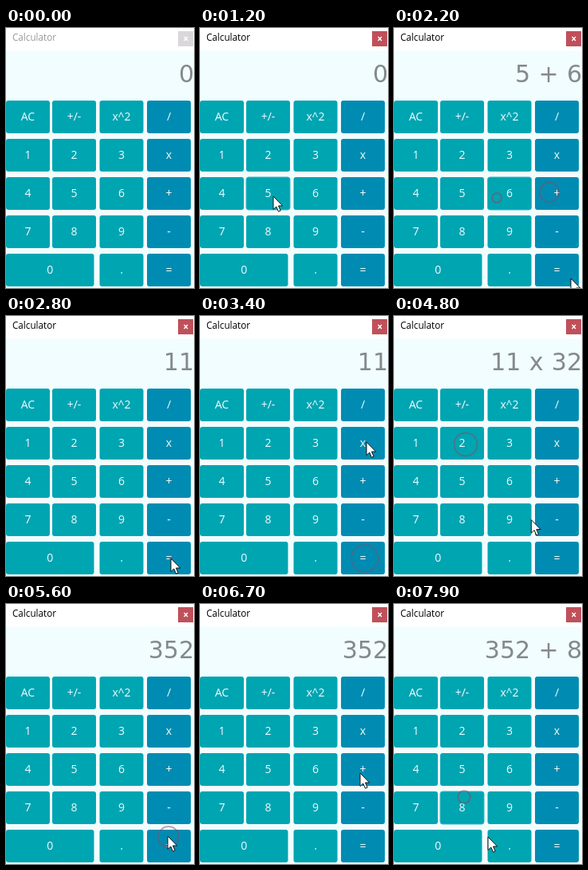
Recreate the animation shown at these times as an HTML page. Size 236 by 326 pixels, loop 8000 ms.

```html
<!DOCTYPE html>
<html lang="en">
<head>
<meta charset="utf-8">
<title>Calculator</title>
<style>
  html, body { margin: 0; width: 100%; height: 100%; overflow: hidden; background: #fff; }
  svg { display: block; width: 236px; height: 326px; }
  text { font-family: "Open Sans", "Noto Sans", sans-serif; }
  .key text { font-size: 14px; fill: #f0fcfd; text-anchor: middle; }
  .key.hover rect { stroke: #2fb9c5; }
  #display {
    font: 30px "DejaVu Sans", sans-serif; fill: #85898b;
    text-anchor: end; white-space: pre; word-spacing: 0.8px;
  }
  #title { font-size: 11.7px; }
</style>
</head>
<body>
<svg viewBox="0 0 236 326">
  <rect width="236" height="326" fill="#f2fdff"/>
  <rect width="236" height="28" fill="#fff"/>
  <text id="title" x="8" y="16">Calculator</text>
  <rect id="close" x="216" y="4" width="19" height="19"/>
  <path d="M223.5 11l4.5 5m0-5l-4.5 5" stroke="#fff" stroke-width="1.4"/>
  <text id="display" x="236" y="68"></text>
  <g id="keys"></g>
  <g id="rings" fill="none" stroke="#8a4a62" stroke-width="2"></g>
  <path id="cursor" d="M0 0V16.5L3.8 13L6.5 19.2L9.2 18L6.5 12H11.7Z" fill="#fff" stroke="#111"/>
</svg>
<script>
const LOOP = 8000, STEP = 100, WAKE = 100;
const HOLD = 70;                      // pointer rests this long around a press
const HOVER = 300, RING_LIFE = 800, RING_SPEED = 0.027;
const $ = id => document.getElementById(id);

function add(parent, tag, attrs, text) {
  const el = document.createElementNS("http://www.w3.org/2000/svg", tag);
  for (const name in attrs) el.setAttribute(name, attrs[name]);
  if (text) el.textContent = text;
  parent.appendChild(el);
  return el;
}

const keys = {};
const columns = [0, 58, 117.5, 177];
["AC +/- x^2 /", "1 2 3 x", "4 5 6 +", "7 8 9 -", "0 _ . ="].forEach((row, r) =>
  row.split(" ").forEach((label, c) => {
    if (label === "_") return;
    const x = columns[c], y = 91 + r * 48;
    const width = label === "0" ? 110.5 : 55;
    const key = keys[label] = add($("keys"), "g", { class: "key" });
    add(key, "rect", { x, y, width, height: 41, rx: 3, fill: c === 3 ? "#008cb2" : "#00a5b2" });
    add(key, "text", { x: x + width / 2, y: y + 25 }, label);
  }));

// Pointer stops: time, x, y and the key pressed there, if any
const stops = [
  [WAKE, 232, 318],
  [1250, 92, 211, "5"], [1750, 195, 206, "+"], [1980, 129, 213, "6"],
  [2200, 222, 314],
  [2770, 207, 304, "="], [3500, 209, 157, "x"],
  [3860, 137, 162, "3"], [4260, 90, 161, "2"], [5120, 204, 292, "="],
  [5600, 203, 291], [6000, 36, 62],
  [6770, 201, 212, "+"],
  [7200, 113, 230],
  [7610, 88, 242, "8"],
  [7900, 118, 292]
].map(([at, x, y, key]) => ({ at, x, y, key, hold: key ? HOLD : 0 }));

const presses = stops.filter(s => s.key);
for (const p of presses) p.ring = add($("rings"), "circle", { cx: p.x, cy: p.y });

function enter(shown, key) {
  if (key === "=") {
    const [a, op, b] = shown.split(" ");
    return String(op === "+" ? +a + +b : a * b);
  }
  if ("+x".includes(key)) return `${shown} ${key} `;
  return shown === "0" ? key : shown + key;
}

function pointerAt(t) {
  const i = stops.findIndex(s => s.at + s.hold > t);
  if (i < 1) return stops[i < 0 ? stops.length - 1 : 0];
  const a = stops[i - 1], b = stops[i];
  const from = a.at + a.hold, to = b.at - b.hold;
  const u = Math.min(1, (t - from) / (to - from));
  const k = u * u * (3 - 2 * u);
  return { x: a.x + (b.x - a.x) * k, y: a.y + (b.y - a.y) * k };
}

function draw(t) {
  const active = t >= WAKE;
  const { x, y } = pointerAt(t);
  $("title").setAttribute("fill", active ? "#000" : "#999");
  $("close").setAttribute("fill", active ? "#c0505a" : "#d9d7da");
  $("cursor").setAttribute("visibility", active ? "visible" : "hidden");
  $("cursor").setAttribute("transform", `translate(${x} ${y})`);

  const distance = p => Math.abs(t - p.at);
  const nearest = presses.reduce((a, b) => distance(b) < distance(a) ? b : a);
  for (const label in keys) {
    const hover = label === nearest.key && distance(nearest) < HOVER;
    keys[label].classList.toggle("hover", hover && label >= "0" && label <= "9");
  }

  let shown = "0";
  for (const { at, key, ring } of presses) {
    const age = t - at;
    if (age >= 0) shown = enter(shown, key);
    const visible = age >= 0 && age < RING_LIFE;
    ring.setAttribute("r", visible ? age * RING_SPEED : 0);
    ring.setAttribute("opacity", visible ? 0.7 - 0.35 * age / RING_LIFE : 0);
  }
  $("display").textContent = shown;
}

const start = performance.now();
function tick() {
  const t = (performance.now() - start) % LOOP;
  draw(Math.floor(t / STEP) * STEP);
  requestAnimationFrame(tick);
}
draw(0);
requestAnimationFrame(tick);
</script>
</body>
</html>
```
